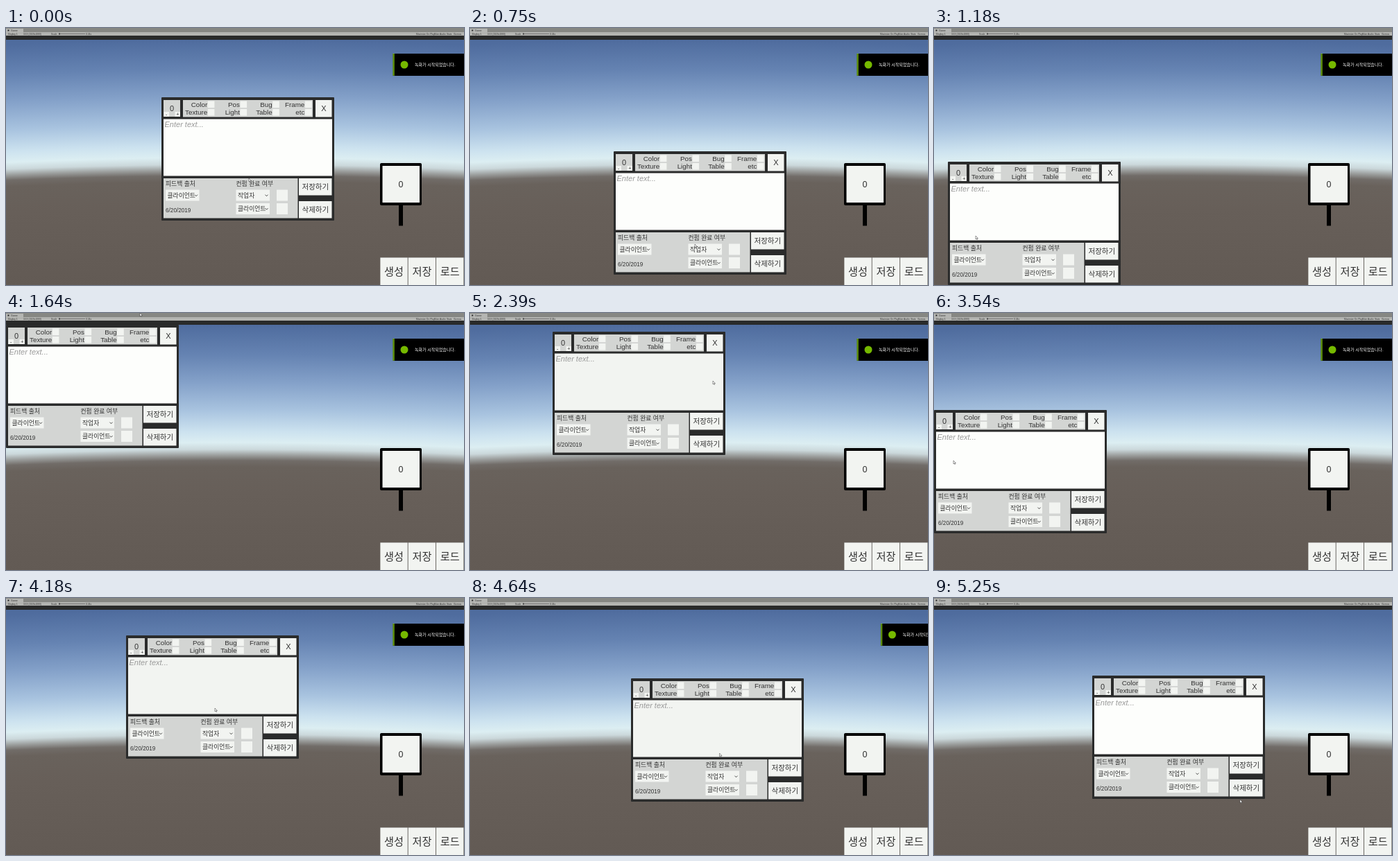
Animation of 660x371 px, one loop 5.29 s. Source, as an HTML page:

```html
<!DOCTYPE html>
<html lang="ko">
<head>
<meta charset="utf-8">
<title>Feedback panel</title>
<style>
  html, body { margin: 0; width: 100%; height: 100%; overflow: hidden; background: #2b2b2b; }
  #stage { position: relative; width: 660px; height: 371px; overflow: hidden; }
  #sky { position: absolute; inset: 0; }
  svg { position: absolute; left: 0; top: 0; display: block; }
  text { font-family: "Liberation Sans", Arial, "Noto Sans CJK KR", sans-serif; fill: #333; }
  .ko { font-family: "Noto Sans CJK KR", "Noto Sans CJK", sans-serif; font-weight: 300; }
  .note { font-weight: 500; }
</style>
</head>
<body>
<div id="stage">
  <div id="sky"></div>
  <svg id="art" width="660" height="371" viewBox="0 0 660 371"></svg>
</div>
<script>
const LOOP = 5290, STEP = 36;
const LIGHT = '#f2f4f1', GREY = '#d3d5d3', DARK = '#2a2b2b', GREEN = '#76b900';
const art = document.getElementById('art');

function add(parent, tag, attrs, content) {
  const el = document.createElementNS('http://www.w3.org/2000/svg', tag);
  for (const k in attrs) el.setAttribute(k, attrs[k]);
  if (content !== undefined) el.textContent = content;
  parent.appendChild(el);
  return el;
}
const group = parent => add(parent, 'g', {});
const rect = (g, x, y, width, height, fill, rx = 0) =>
  add(g, 'rect', { x, y, width, height, fill, rx });
const label = (g, x, y, size, s, extra = {}) =>
  add(g, 'text', { x, y, 'font-size': size, ...extra }, s);
const MID = { 'text-anchor': 'middle' }, END = { 'text-anchor': 'end' };
const KO = { class: 'ko' }, KO_MID = { class: 'ko', ...MID };

// Sky and ground as rings of one huge circle, so the horizon bends slightly
const SKY = [
  [371, '#625a54'], [260, '#675f59'], [222, '#69625c'], [213, '#716c68'],
  [205, '#9da09f'], [197, '#cbd8db'], [187, '#dceef2'], [171, '#cce2ef'],
  [140, '#a8c3df'], [100, '#84a1c9'], [60, '#6583b2'], [17, '#4f6c9e']
];
const FAR = 8007;
document.getElementById('sky').style.background =
  `radial-gradient(circle ${FAR}px at 330px ${FAR}px, ` +
  SKY.map(([y, c]) => `${c} ${FAR - y}px`).join(', ') + ')';

function drawTopBar() {
  const g = group(art);
  rect(g, 0, 0, 660, 6, '#868783');
  rect(g, 0, 1, 25, 6, '#b5b6b3');
  rect(g, 0, 6, 660, 5, '#b3b4b1');
  rect(g, 0, 11, 660, 6, '#292a2a');
  rect(g, 2.5, 2.5, 2, 2, '#222');
  label(g, 7, 5, 3.6, 'Game');
  label(g, 3, 9.8, 3.3, 'Display 1');
  label(g, 25, 9.8, 3.3, '16:9 (1920x1080)');
  label(g, 65, 9.8, 3.3, 'Scale');
  rect(g, 76, 8.3, 38, 0.7, '#555');
  rect(g, 76, 7.5, 2, 2, '#444');
  label(g, 115, 9.8, 3.3, '0.34x');
  label(g, 591, 9.8, 3.3, 'Maximize On Play');
  label(g, 617, 9.8, 3.3, 'Mute Audio');
  label(g, 635, 9.8, 3.3, 'Stats');
  label(g, 645, 9.8, 3.3, 'Gizmos');
}

function drawBoard() {
  const g = group(art);
  rect(g, 566, 255, 6, 30.5, '#000');
  rect(g, 539, 195, 60, 61, '#000', 2);
  rect(g, 542.5, 199, 53.5, 53, LIGHT);
  label(g, 569, 230.2, 12.5, '0', MID);
}

function drawMenu() {
  const g = group(art);
  rect(g, 539, 331, 121, 40, '#6b6864');
  ['생성', '저장', '로드'].forEach((s, i) => {
    rect(g, 539.4 + i * 40.3, 331.5, 39.3, 39.5, LIGHT);
    label(g, 559 + i * 40.4, 357, 15.2, s, KO_MID);
  });
}

function dropdown(g, x, y, s) {
  rect(g, x, y, 48.5, 16, LIGHT);
  label(g, x + 2.5, y + 11, 8.8, s, KO);
  add(g, 'path', {
    d: `M${x + 42} ${y + 7.2}l2 2l2 -2`, fill: 'none', stroke: '#333', 'stroke-width': 0.9
  });
}

function drawPanel() {
  const g = group(art);
  rect(g, 0, 0, 249, 178, DARK, 1);

  rect(g, 3, 4, 24, 24, GREY);
  rect(g, 3.5, 21, 7.5, 7, LIGHT);
  rect(g, 19.5, 21, 7.5, 7, LIGHT);
  label(g, 15, 20, 11, '0', MID);
  label(g, 7.2, 26.5, 7, '-', MID);
  label(g, 23.2, 27, 7, '+', MID);

  rect(g, 31, 4, 187, 24.5, GREY);
  const tags = [['Color', 'Texture'], ['Pos', 'Light'], ['Bug', 'Table'], ['Frame', 'etc']];
  tags.forEach((pair, i) => pair.forEach((s, j) => {
    const x = 66.5 + i * 46.7, y = 5.5 + j * 11.5;
    rect(g, x + 0.3, y, 9.6, 9.6, LIGHT);
    label(g, x - 0.3, y + 8.4, 9.8, s, END);
  }));

  rect(g, 222, 4, 23.5, 24.5, LIGHT);
  label(g, 233.8, 19.6, 11, 'X', MID);

  const field = rect(g, 3, 31.5, 243, 82, '#fdfefc');
  label(g, 4.5, 42.8, 11, 'Enter text...', { 'font-style': 'italic', style: 'fill:#999' });

  rect(g, 3, 117, 193.5, 57.5, GREY);
  label(g, 6, 128, 8.8, '피드백 출처', KO);
  label(g, 107.5, 128, 8.8, '컨펌 완료 여부', KO);
  dropdown(g, 6, 133.5, '클라이언트');
  dropdown(g, 107.5, 133.5, '작업자');
  dropdown(g, 107.5, 153, '클라이언트');
  rect(g, 166, 133.5, 16, 16, LIGHT);
  rect(g, 166, 153, 16, 16, LIGHT);
  label(g, 6, 165.7, 8.2, '6/20/2019');

  rect(g, 198, 117, 47.5, 24.5, LIGHT);
  rect(g, 198, 150, 47.5, 24.5, LIGHT);
  label(g, 221.8, 133.3, 10.5, '저장하기', KO_MID);
  label(g, 221.8, 166, 10.5, '삭제하기', KO_MID);
  return { g, field };
}

function drawNotice() {
  const g = group(art);
  rect(g, 557.5, 37, 3, 32, '#40620a');
  add(g, 'path', {
    d: 'M558.5 37v32', stroke: GREEN, 'stroke-width': 2, 'stroke-dasharray': '1 1'
  });
  rect(g, 560, 37, 100, 32, '#000');
  add(g, 'circle', { cx: 574, cy: 53, r: 5.5, fill: GREEN });
  label(g, 589, 55.2, 6, '녹화가 시작되었습니다.', { class: 'ko note', style: 'fill:#fff' });
  return g;
}

drawTopBar();
drawBoard();
drawMenu();
const panel = drawPanel();
const notice = drawNotice();
const cursor = add(art, 'path', {
  d: 'M0 0V4.8L1.1 3.8L1.9 5.5L2.7 5.1L2 3.5H3.4Z',
  fill: '#fff', stroke: '#333', 'stroke-width': 0.5
});

// time, panel x, panel y, cursor x, cursor y
const DRAG = [
  [0, 224, 100, 350, 217], [110, 224, 100, 351, 217], [180, 224, 100, 352, 216],
  [430, 224, 100, 352, 216], [750, 207, 178, 324, 312], [930, 158, 193, 240, 330],
  [1150, 20, 193, 60, 300], [1460, 0, 32, 70, 70], [1640, 0, 17, 193, 0],
  [1750, 90, 80, 260, 190], [1860, 72, 184, 200, 296], [2180, 72, 184, 200, 296],
  [2390, 119, 27, 350, 98], [2610, 300, 60, 428, 172], [2710, 300, 60, 428, 172],
  [2960, 280, 193, 380, 310], [3210, 84, 193, 150, 300], [3400, 0, 190, 20, 290],
  [3540, 0, 140, 28, 213], [3680, 0, 40, 60, 120], [3790, 20, 17, 120, 100],
  [4180, 173, 54, 301, 159], [4450, 235, 120, 363, 228], [4820, 228, 112, 356, 220],
  [5250, 228, 112, 441, 291]
];

function pose(t) {
  let i = DRAG.length - 1;
  while (DRAG[i][0] > t) i--;
  const a = DRAG[i], b = DRAG[i + 1] || a;
  const span = b[0] - a[0] || 1;
  const u = Math.floor((t - a[0]) / STEP) * STEP / span;
  return a.map((v, k) => v + (b[k] - v) * u);
}

const within = (t, a, b) => t >= a && t < b;
const place = (el, x, y) => el.setAttribute('transform', `translate(${x} ${y})`);

function draw(t) {
  const [, px, py, cx, cy] = pose(t);
  place(panel.g, Math.round(px), Math.round(py));
  place(cursor, cx, cy);
  const hover = within(t, 2250, 2720) || within(t, 4000, 4700);
  panel.field.setAttribute('fill', hover ? LIGHT : '#fdfefc');
  const out = Math.min(1, Math.max(0, (t - 4480) / 280));
  place(notice, 104 * out * out, 0);
}

const start = performance.now();
function tick() {
  draw((performance.now() - start) % LOOP);
  requestAnimationFrame(tick);
}
draw(0);
requestAnimationFrame(tick);
</script>
</body>
</html>
```
